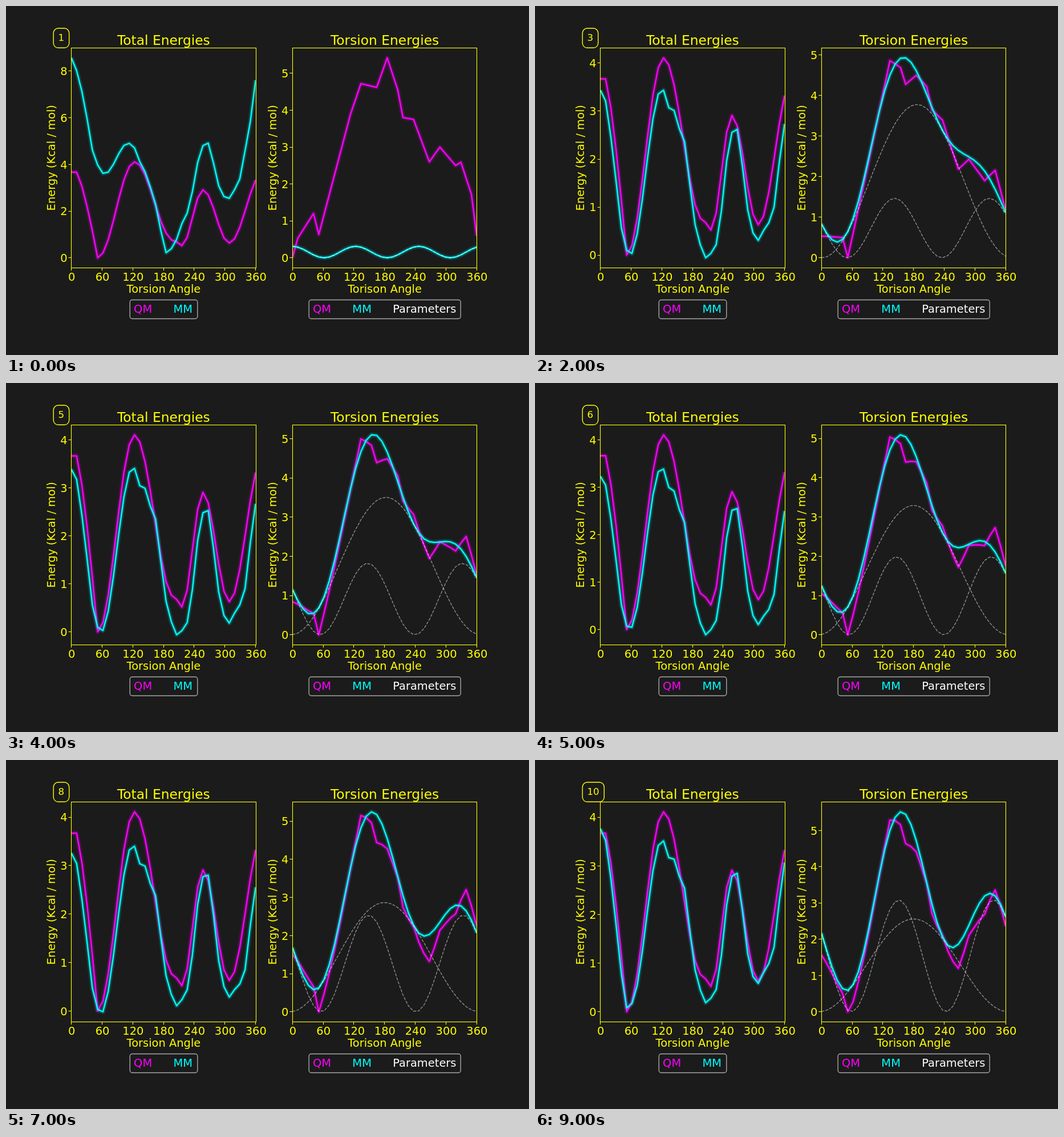
Write an HTML page with a canvas that moves like this. It is 917 px wide and 611 px high and loops after 10000 ms.

```html
<!DOCTYPE html>
<html lang="en">
<head>
<meta charset="utf-8">
<title>Torsion fit</title>
<style>
  html, body { margin: 0; width: 100%; height: 100%; overflow: hidden; background: #1b1b1b; }
  canvas { display: block; }
</style>
</head>
<body>
<canvas id="stage" width="917" height="611"></canvas>
<script>
const ctx = document.getElementById('stage').getContext('2d');
const YELLOW = '#ff0', MAGENTA = '#f0f', CYAN = '#0ff';
const FONT = '"DejaVu Sans", sans-serif';
const TOP = 73.25, BOTTOM = 458.25, WIDTH = 323, POINTS = 36;
const STEP_MS = 1000, STEPS = 10;

const rad = degrees => degrees * Math.PI / 180;
const samples = fn => Array.from({ length: POINTS }, (_, i) => fn(i));
const smooth = t => (1 - Math.cos(Math.PI * t)) / 2;
const linear = t => t;
const plunge = t => t ** 1.3;

// Samples a curve through [index, energy, easing towards this point] keys.
const curve = (keys, defaultEase) => samples(i => {
  const next = Math.max(1, keys.findIndex(([at]) => at >= i));
  const [x0, y0] = keys[next - 1], [x1, y1, ease = defaultEase] = keys[next];
  return y0 + (y1 - y0) * ease((i - x0) / (x1 - x0));
});

// Turning points of the energies in kcal/mol; one index is 10 degrees.
const quantumTotal = curve([
  [0, 3.67], [1, 3.67], [5, 0, plunge], [12, 4.11], [19.5, .73],
  [21, .52], [25, 2.91], [30, .63], [36.4, 3.67]], smooth);
const unfittedTorsion = curve([
  [0, 0], [1, .53], [4, 1.2], [5, .63], [11, 3.88], [13, 4.72], [16, 4.62], [18, 5.42],
  [20, 4.55], [21, 3.8], [23, 3.75], [26, 2.6], [28, 3], [31, 2.5], [32, 2.59],
  [34, 1.72], [35, .59]], linear);
const fittedTorsion = curve([
  [0, .43], [4, .48], [5, 0], [13, 4.77], [15, 4.59], [16, 4.18], [18, 4.43], [20, 4.2],
  [21, 3.65], [23, 3.42], [26, 2.2], [28, 2.4], [31, 1.8], [33, 2.03], [35, 1.05]], linear);

// One- and two-fold terms as [amplitude, peak angle]; energy offset of the total;
// pull on the quantum torsion as [one-fold, two-fold, constant].
const fits = {
  1: { one: [1.922, 182], two: [.636, 135], offset: -.53, pull: [0, 0, 0] },
  3: { one: [1.858, 180.5], two: [.831, 143], offset: -.54, pull: [.04, .13, .1] },
  5: { one: [1.648, 175], two: [.993, 142.4], offset: -.635, pull: [.35, .43, .06] },
  6: { one: [1.6, 175], two: [1.155, 143.7], offset: -.655, pull: [.7, .61, -.04] },
  8: { one: [1.268, 175], two: [1.38, 145.4], offset: -.54, pull: [.63, .82, .16] },
  9: { one: [1.28, 175], two: [1.54, 147], offset: -.51, pull: [.63, .89, .06] }
};

const wave = (fold, i, peak) => Math.cos(fold * rad(10 * i - peak));
const cosineTerm = (fold, [amp, peak]) => samples(i => amp * (1 + wave(fold, i, peak)));
const mean = (a, b) => Array.isArray(a) ? a.map((v, i) => mean(v, b[i])) : (a + b) / 2;

function fitAt(step) {
  if (fits[step]) return fits[step];
  const a = fits[step - 1], b = fits[step + 1];
  return Object.fromEntries(Object.keys(a).map(key => [key, mean(a[key], b[key])]));
}

function energiesAt(step) {
  let terms, quantum, offset;
  if (step === 0) {
    terms = [cosineTerm(3, [.155, 0])];
    quantum = unfittedTorsion;
    offset = 4.585;
  } else {
    const fit = fitAt(step), [one, two, constant] = fit.pull;
    terms = [cosineTerm(1, fit.one), cosineTerm(2, fit.two)];
    quantum = fittedTorsion.map((v, i) =>
      Math.max(0, v + one * wave(1, i, 23) + two * wave(2, i, 152) + constant));
    offset = fit.offset;
  }
  const mechanics = samples(i => terms.reduce((sum, term) => sum + term[i], 0));
  const total = samples(i => quantumTotal[i] + mechanics[i] - quantum[i] + offset);
  return { terms, quantum, mechanics, total };
}

function text(string, x, y, { size = 19.44, color = YELLOW, align = 'center' } = {}) {
  ctx.font = `${size}px ${FONT}`;
  ctx.fillStyle = color;
  ctx.textAlign = align;
  ctx.fillText(string, x, y);
}

function roundBox(x, y, w, h, r, color) {
  ctx.strokeStyle = color;
  ctx.lineWidth = 1.39;
  ctx.beginPath();
  ctx.roundRect(x, y, w, h, r);
  ctx.stroke();
}

function segment(x1, y1, x2, y2) {
  ctx.beginPath();
  ctx.moveTo(x1, y1);
  ctx.lineTo(x2, y2);
  ctx.stroke();
}

function glowLine(path, color) {
  ctx.strokeStyle = color;
  ctx.globalAlpha = .035;
  for (let n = 1; n <= 10; n++) {
    ctx.lineWidth = 2.3 + .7 * n;
    ctx.stroke(path);
  }
  ctx.globalAlpha = 1;
  ctx.lineWidth = 2.3;
  ctx.stroke(path);
}

function panel(left, title, xLabel, quantum, mechanics, terms = []) {
  const all = [...quantum, ...mechanics, ...terms.flat()];
  const min = Math.min(...all), max = Math.max(...all), margin = (max - min) * .05;
  const low = min - margin, high = max + margin;
  const toY = v => BOTTOM - (v - low) / (high - low) * (BOTTOM - TOP);
  const pathOf = values => {
    const path = new Path2D();
    values.forEach((v, i) => path.lineTo(left + WIDTH * i / (POINTS - 1), toY(v)));
    return path;
  };

  ctx.save();
  ctx.beginPath();
  ctx.rect(left, TOP, WIDTH, BOTTOM - TOP);
  ctx.clip();
  ctx.lineJoin = 'round';
  glowLine(pathOf(quantum), MAGENTA);
  glowLine(pathOf(mechanics), CYAN);
  ctx.strokeStyle = 'rgba(255,255,255,.5)';
  ctx.lineWidth = 1.39;
  ctx.setLineDash([5.14, 2.22]);
  terms.forEach(term => ctx.stroke(pathOf(term)));
  ctx.restore();

  const snap = v => Math.floor(v) + .5;
  const right = Math.round(left + WIDTH) + .5;
  ctx.strokeStyle = YELLOW;
  ctx.lineWidth = 1.11;
  ctx.strokeRect(snap(left), snap(TOP), right - snap(left), snap(BOTTOM) - snap(TOP));
  for (let angle = 0; angle <= 360; angle += 60) {
    const x = left + WIDTH * angle / 360;
    segment(snap(x), BOTTOM, snap(x), BOTTOM + 5);
    text(angle, x + .6, 481.2);
  }
  const tickStep = high > 6 ? 2 : 1;
  for (let v = 0; v <= high + .01; v += tickStep) {
    const y = toY(v);
    segment(left - 5, snap(y), left, snap(y));
    text(v, left - 7, y + 7.3, { align: 'right' });
  }

  const middle = left + WIDTH / 2;
  text(title, middle + .3, 67.6, { size: 23.33 });
  text(xLabel, middle + .3, 502.4);
  ctx.save();
  ctx.translate(left - 28.8, (TOP + BOTTOM) / 2);
  ctx.rotate(-Math.PI / 2);
  text('Energy (Kcal / mol)', 0, 0);
  ctx.restore();
}

function legend(x, width, names) {
  const colors = [MAGENTA, CYAN, '#fff'];
  roundBox(x, 514.5, width, 33, 4, '#a9a9a9');
  let cursor = x + 6.8;
  names.forEach((name, i) => {
    text(name, cursor, 537, { color: colors[i], align: 'left' });
    cursor += ctx.measureText(name).width + 37.3;
  });
}

function draw(step) {
  const { terms, quantum, mechanics, total } = energiesAt(step);
  ctx.fillStyle = '#1b1b1b';
  ctx.fillRect(0, 0, 917, 611);
  panel(114.6, 'Total Energies', 'Torsion Angle', quantumTotal, total);
  panel(502.3, 'Torsion Energies', 'Torison Angle', quantum, mechanics, terms);
  legend(217.3, 118.5, ['QM', 'MM']);
  legend(531.2, 266, ['QM', 'MM', 'Parameters']);

  const label = String(step + 1);
  text(label, 91.5, 61.3, { size: 16.67, align: 'left' });
  roundBox(83.2, 39, ctx.measureText(label).width + 16.9, 34.3, 8.3, YELLOW);
}

const start = performance.now();
function tick() {
  draw(Math.floor((performance.now() - start) / STEP_MS) % STEPS);
  requestAnimationFrame(tick);
}
tick();
</script>
</body>
</html>
```
